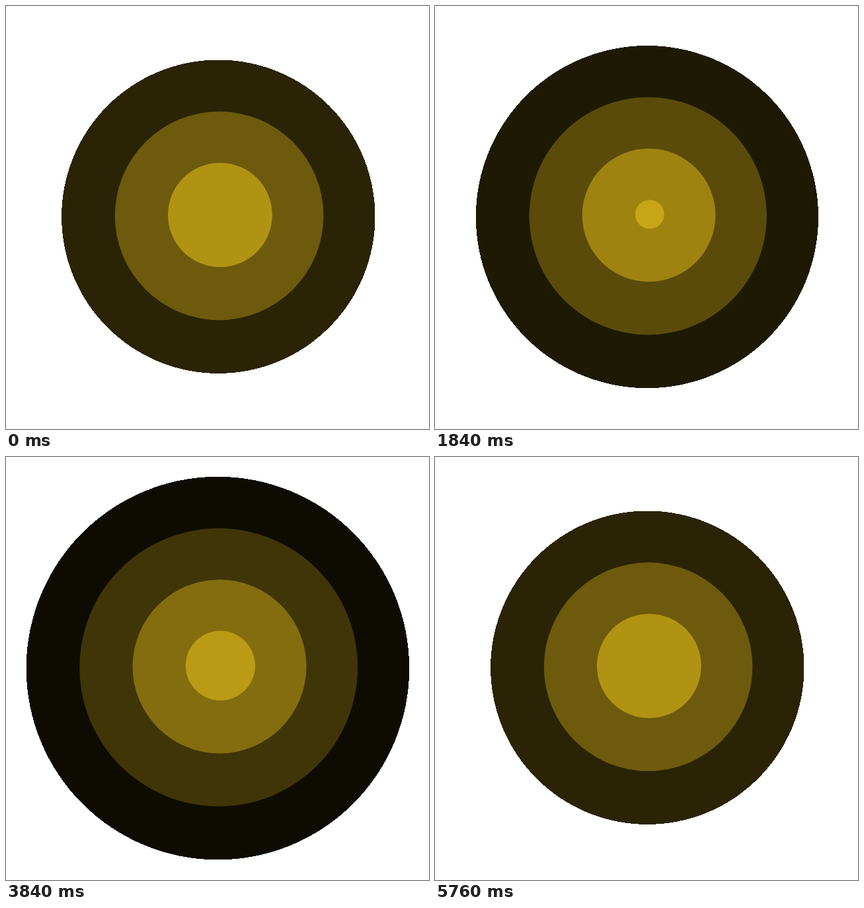
Write an HTML page that moves like this. It is 640 px wide and 640 px high and loops after 5800 ms.

```html
<!DOCTYPE html>
<html lang="en">
<head>
<meta charset="utf-8">
<title>Rings</title>
<style>
  html, body { margin: 0; width: 100%; height: 100%; overflow: hidden; background: #fff; }
  svg { display: block; width: 100%; height: 100%; }
</style>
</head>
<body>
<svg id="stage" viewBox="0 0 640 640"></svg>
<script>
const STEP = 40, STEPS = 145, CYCLE = 36;
const RINGS = 4, MAX_R = 315.6, CENTER = 320, DRIFT = 5.2;

// Red level at evenly spaced stages of growth; green and blue follow in proportion
const REDS = [208, 177, 109, 42, 0];
const TINT = [1, .83, .11];

const stage = document.getElementById('stage');

// Largest ring first, so smaller ones lie on top
const rings = Array.from({ length: RINGS }, () =>
  stage.appendChild(document.createElementNS('http://www.w3.org/2000/svg', 'circle')));

// The outline against the page is hard-edged and takes in partly covered pixels
rings[0].setAttribute('shape-rendering', 'crispEdges');
const edge = i => i === 0 ? .5 : 0;

function shade(stageIndex, phase) {
  const from = REDS[stageIndex], to = REDS[stageIndex + 1];
  const red = from + (to - from) * phase;
  return `rgb(${TINT.map(k => Math.round(red * k))})`;
}

function draw(time) {
  const step = Math.floor(time / STEP) % STEPS;
  const phase = step % CYCLE / CYCLE;
  rings.forEach((ring, i) => {
    const stageIndex = RINGS - 1 - i;
    const growth = (stageIndex + phase) / RINGS;
    const shift = DRIFT * (1 - growth);
    ring.setAttribute('cx', CENTER + shift);
    ring.setAttribute('cy', CENTER - shift);
    ring.setAttribute('r', MAX_R * growth + edge(i));
    ring.setAttribute('fill', shade(stageIndex, phase));
  });
}

const start = performance.now();
function tick() {
  draw(performance.now() - start);
  requestAnimationFrame(tick);
}
tick();
</script>
</body>
</html>
```
